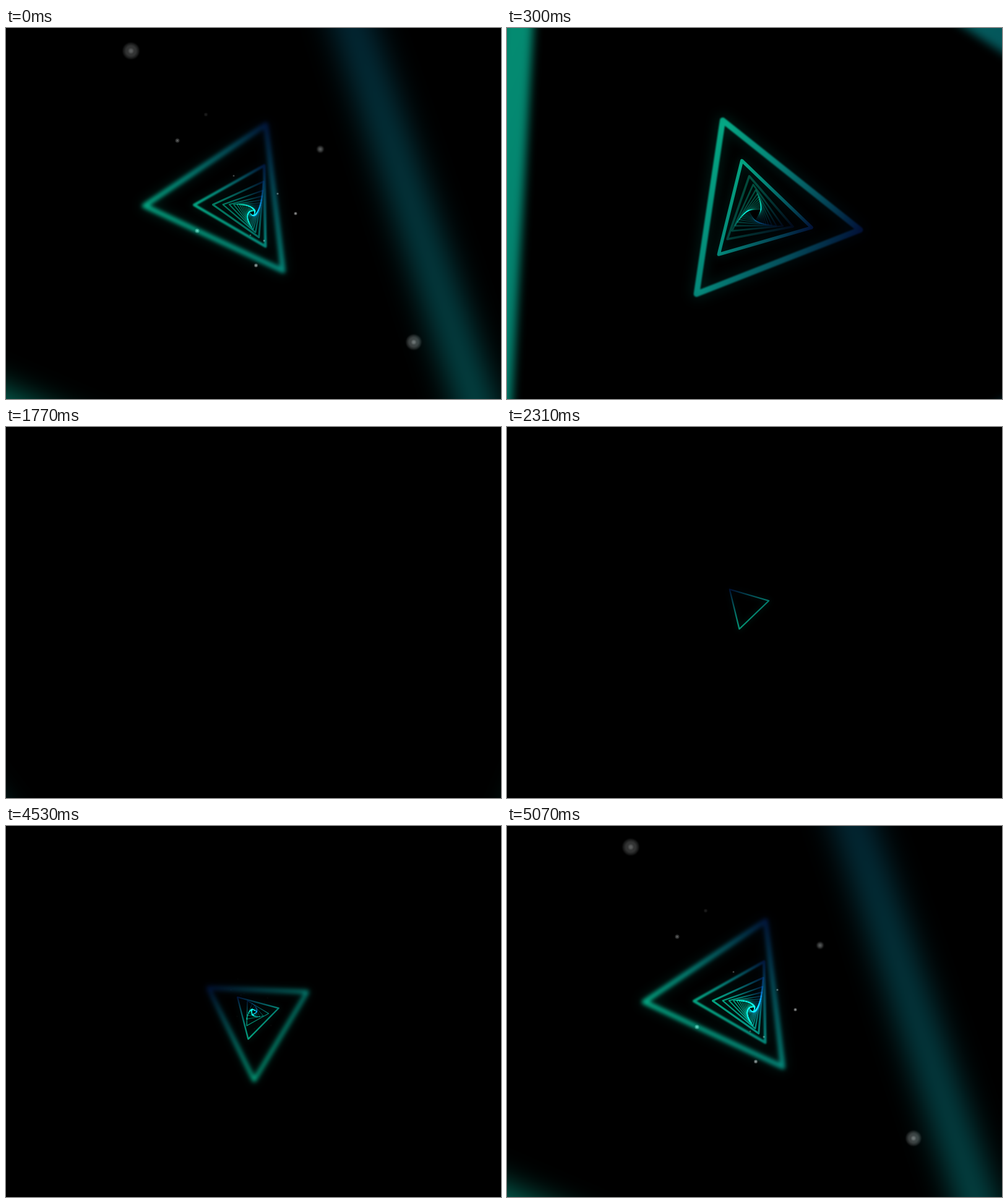
These frames come from a looping animation (800x600 px, 5100 ms). An HTML page with a canvas:

```html
<!DOCTYPE html>
<html lang="en">
<head>
<meta charset="utf-8">
<title>Triangle tunnel</title>
<style>
  html, body { margin: 0; width: 100%; height: 100%; overflow: hidden; background: #000; }
  canvas { display: block; }
</style>
</head>
<body>
<canvas id="stage" width="800" height="600"></canvas>
<script>
const ctx = document.getElementById('stage').getContext('2d');
const LOOP = 5100, STEP = 30, COUNT = 31;
const FOCAL = 391, DEPTH = 1.348, RADIUS = 0.577, TWIST = 5.3;
const FAR = 30.2, RAD = Math.PI / 180;

// x, y, radius, brightness of each dust mote at rest
const DUST = [
  [202, 37, 13, .5], [659, 508, 12, .6], [508, 196, 5.5, .6], [277, 182, 3.5, .6],
  [468, 300, 2.6, 1], [404, 384, 3, 1], [309, 328, 3.6, .6], [368, 239, 1.6, .6],
  [439, 268, 1.8, .7], [323, 140, 3, .2], [395, 335, 1.5, .5], [417, 344, 1.8, .6]
];

// Keyed values: time, value, time, value ...
const KEYS = {
  offX: [0, -.15, 300, .03, 570, 0, 1770, 0, 2310, -.21, 2820, -.21, 3480, 0, 4020, 0, 4530, .03, 5070, -.15],
  offY: [0, -.108, 300, .007, 570, 0, 1770, 0, 2310, -.15, 2820, -.15, 3480, .05, 4020, .05, 4530, .07, 5070, -.108],
  tilt: [0, .2, 300, 0, 3990, 0, 4530, .2, 5070, .2],
  zoom: [0, 1, 300, 1.2, 600, 1.2, 1770, 1, 5070, 1],
  blur: [0, .02, 300, .005, 600, .015, 1770, .015, 2310, 0, 4000, 0, 4300, .04, 4530, .04, 5070, .02],
  core: [0, .75, 300, .45, 600, .6, 1770, 1, 4000, .6, 4530, 1, 5070, 1.1],
  panX: [0, 0, 4530, 0, 5070, -2],
  panY: [0, 0, 4530, 0, 5070, -3],
  turn: [0, -157, 4530, -157, 5070, -72]
};

function keyed(list, t) {
  let i = 0;
  while (i + 2 < list.length && t >= list[i + 2]) i += 2;
  if (i + 2 >= list.length) return list[i + 1];
  const u = (t - list[i]) / (list[i + 2] - list[i]);
  return list[i + 1] + (list[i + 3] - list[i + 1]) * u * u * (3 - 2 * u);
}

// Distance flown through the tunnel since the start of the loop
const flown = t => 0.0579 * (t - 59 * (1 - Math.exp(-t / 59)));

// Depth and angle of every visible triangle
function triangles(t) {
  const list = [];
  if (t < 600) {
    for (let k = 0; k < COUNT; k++) {
      list.push({ z: k + .2 - flown(t), angle: -72 + TWIST * (k + .2), alpha: 1 });
    }
  } else if (t >= 1770) {
    const turn = keyed(KEYS.turn, t);
    if (t < 4020) {
      const u = Math.min(1, (t - 1770) / 1530);
      const z = .15 + (FAR - .15) * Math.pow(u, 1.88);
      list.push({ z, angle: turn + TWIST * z, alpha: 1 });
    } else {
      const u = Math.min(1, (t - 4000) / 1040);
      const q = 1 - Math.pow(1 - u, 5.7);
      const bump = .28 * Math.sin(Math.PI * u);
      for (let k = 0; k < COUNT; k++) {
        const p = Math.pow(q, k * k + .25);
        const z = FAR - (FAR - k - .2) * p - bump / (1 + 4 * k);
        list.push({ z, angle: turn + TWIST * z, alpha: 1 });
      }
      // Triangles packed together share their light
      for (let k = 0; k < COUNT - 1; k++) {
        list[k].alpha = Math.min(1, .08 + Math.abs(list[k + 1].z - list[k].z));
      }
    }
  }
  return list;
}

function drawTriangle(tri, view) {
  if (tri.z < .04) return;
  const pts = [];
  for (let i = 0; i < 3; i++) {
    const a = (tri.angle + i * 120) * RAD;
    const x = RADIUS * Math.cos(a), y = RADIUS * Math.sin(a);
    const depth = DEPTH * tri.z - view.tilt * y;
    if (depth < .05) return;
    const s = FOCAL * view.zoom / depth;
    pts.push([400 + view.panX + s * (view.offX + x), 300 + view.panY + s * (view.offY + y)]);
  }
  const side = FOCAL * view.zoom / (DEPTH * tri.z);
  if (side > 5000) return;

  const cx = (pts[0][0] + pts[1][0] + pts[2][0]) / 3;
  const cy = (pts[0][1] + pts[1][1] + pts[2][1]) / 3;
  const dir = (tri.angle + 200) * RAD, r = RADIUS * side;
  const dx = Math.cos(dir) * r, dy = Math.sin(dir) * r;
  const paint = ctx.createLinearGradient(cx - dx * .94, cy - dy * .94, cx + dx * .77, cy + dy * .77);
  paint.addColorStop(0, 'rgb(2,16,50)');
  paint.addColorStop(.3, 'rgb(4,70,82)');
  paint.addColorStop(.65, 'rgb(4,120,108)');
  paint.addColorStop(1, 'rgb(4,148,116)');

  ctx.beginPath();
  pts.forEach(p => ctx.lineTo(p[0], p[1]));
  ctx.closePath();
  ctx.strokeStyle = paint;
  ctx.lineJoin = 'round';
  ctx.lineWidth = Math.max(.7, .033 * side);
  const light = tri.alpha * (tri.z > 3 ? view.core : 1);
  const sigma = view.blur * Math.max(0, side - 70);
  ctx.globalAlpha = Math.min(1, light);
  ctx.filter = sigma > .3 ? `blur(${sigma.toFixed(2)}px)` : 'none';
  ctx.stroke();

  // Faint halo
  if (side > 40 && side < 320) {
    ctx.globalAlpha = Math.min(1, light) * .22;
    ctx.filter = `blur(${(3 + .025 * side).toFixed(2)}px)`;
    ctx.lineWidth *= 1.6;
    ctx.stroke();
  }
  ctx.filter = 'none';
}

function disc(x, y, r, alpha) {
  ctx.globalAlpha = alpha;
  ctx.beginPath();
  ctx.arc(x, y, r, 0, 2 * Math.PI);
  ctx.fill();
}

function drawDust(t, view) {
  let shift, fade;
  if (t < 600) {
    shift = -flown(t);
    fade = Math.max(0, 1 - t / 260);
  } else if (t > 4500) {
    const u = (t - 4500) / 570;
    shift = 12 * Math.pow(1 - u, 3);
    fade = Math.min(1, u * 1.5);
  } else return;

  ctx.fillStyle = '#c4c8c8';
  for (const [x, y, r, light] of DUST) {
    const z = 15 / r, near = z + shift;
    if (near < .15) continue;
    const s = z / near, size = r * s;
    const px = 400 + view.panX + (x - 400) * s;
    const py = 300 + view.panY + (y - 300) * s;
    const a = light * fade;
    ctx.filter = size > 4 ? 'blur(1px)' : 'none';
    disc(px, py, size, a * .3);
    disc(px, py, size * .75, a * .22);
    disc(px, py, size * .28, a * .4);
  }
  ctx.filter = 'none';
}

function draw(t) {
  const view = {};
  for (const name in KEYS) view[name] = keyed(KEYS[name], t);
  ctx.globalCompositeOperation = 'source-over';
  ctx.globalAlpha = 1;
  ctx.fillStyle = '#000';
  ctx.fillRect(0, 0, 800, 600);
  ctx.globalCompositeOperation = 'lighter';
  triangles(t).reverse().forEach(tri => drawTriangle(tri, view));
  drawDust(t, view);
}

const start = performance.now();
let shown = -1;
function tick() {
  const elapsed = (performance.now() - start) % LOOP;
  const t = Math.floor(elapsed / STEP) * STEP;
  if (t !== shown) draw(shown = t);
  requestAnimationFrame(tick);
}
tick();
</script>
</body>
</html>
```
